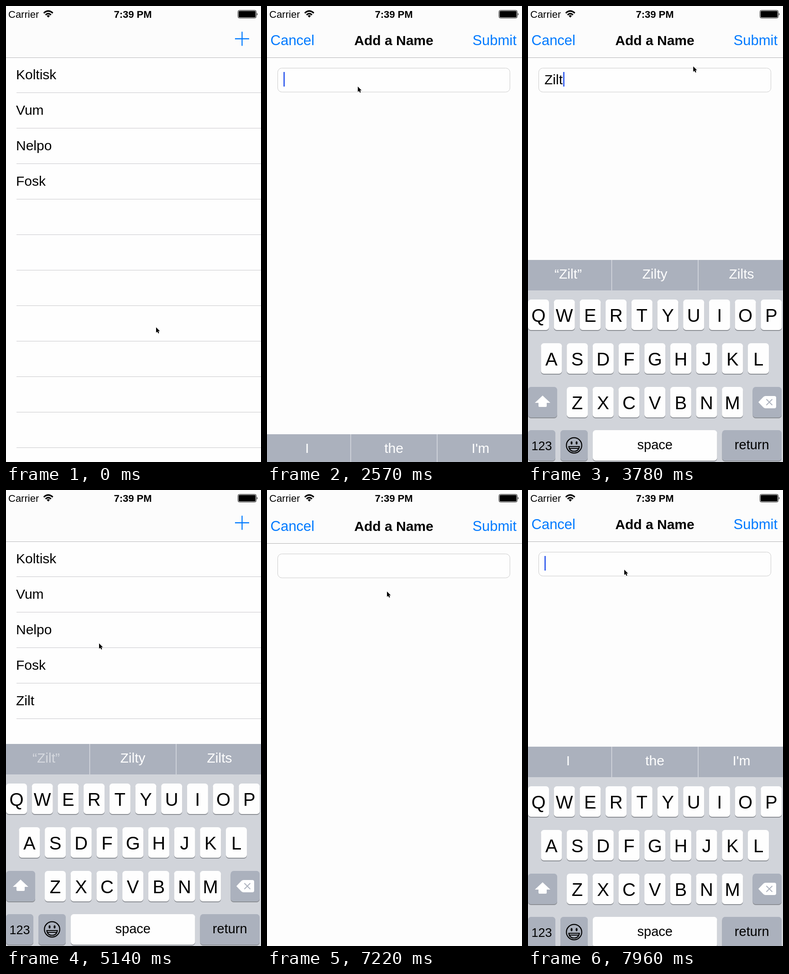
These frames come from a looping animation (559x1002 px, 8 s). An HTML page:

```html
<!DOCTYPE html>
<html lang="en">
<head>
<meta charset="utf-8">
<title>Add a Name</title>
<style>
  html, body { margin: 0; height: 100%; overflow: hidden; background: #fefefe; }
  svg { display: block; width: 100%; height: 100%; }
  text { font: 30px "Liberation Sans", Arial, sans-serif; white-space: pre; }
  .mid { text-anchor: middle; }
  .bold { font-weight: bold; }
  .status { font-size: 22px; }
  .action { font-size: 31px; fill: #007aff; }
  .letter { font-size: 40px; }
  .hint { fill: #fff; text-anchor: middle; }
</style>
</head>
<body>
<svg viewBox="0 0 559 1002">
  <g id="list">
    <rect width="559" height="1002" fill="#fefefe"/>
    <rect width="559" height="113" fill="#fcfcfc"/>
    <path d="M0 113.5H559" stroke="#b9b9bb"/>
    <path id="plus" d="M502 72H533M517.5 56.5V87.5" stroke="#007aff" stroke-width="2.3"/>
  </g>

  <g id="modal">
    <rect width="559" height="1002" fill="#fdfdfd"/>
    <rect width="559" height="113" fill="#fcfcfc"/>
    <path d="M0 113.5H559" stroke="#b2b2b4"/>
    <text class="action" x="7.5" y="86">Cancel</text>
    <text class="mid bold" x="278" y="86">Add a Name</text>
    <text id="submit" class="action" x="547" y="86" text-anchor="end">Submit</text>
    <rect x="23.5" y="136.5" width="509" height="52.5" rx="9" fill="#fefefe" stroke="#cbcbcb"/>
    <text id="typed" x="36" y="172"></text>
    <rect id="caret" y="145" width="3" height="32" fill="#3f66ee"/>
  </g>

  <g id="keyboard">
    <rect width="559" height="446" fill="#d1d4da"/>
    <rect width="559" height="67" fill="#abb1bd"/>
    <path d="M183.5 0V67M373 0V67" stroke="#d9dce2" stroke-width="1.5"/>
    <g id="hints"></g>
    <g id="keys"></g>
    <path d="M32 298L49 314H41V321Q41 323 39 323H25Q23 323 23 321V314H15Z" fill="#fff"/>
    <path d="M505 312.5L516 301Q518 299 521 299H540Q544 299 544 303V322Q544 326 540 326H521Q518 326 516 324Z" fill="#fff"/>
    <path d="M522.5 306L535.5 319M535.5 306L522.5 319" stroke="#abb1bd" stroke-width="2"/>
    <g fill="none" stroke="#000" stroke-width="2.2">
      <circle cx="101" cy="407.5" r="16.8"/>
      <path d="M89.5 410H112.5Q111 420.5 101 420.5T89.5 410ZM91 414H111"/>
    </g>
    <ellipse cx="95.5" cy="402" rx="2" ry="3.6"/>
    <ellipse cx="106.5" cy="402" rx="2" ry="3.6"/>
  </g>

  <text class="status" x="5" y="26">Carrier</text>
  <text class="status mid bold" x="278" y="26">7:39 PM</text>
  <g fill="none" stroke="#000" stroke-width="3.2">
    <path d="M82.8 15.6Q92.7 6.4 102.6 15.6M86.7 19.6Q92.7 14 98.7 19.6"/>
    <path d="M89.2 21.6Q92.7 18.6 96.2 21.6L92.7 25.4Z" fill="#000" stroke="none"/>
  </g>
  <rect x="508.5" y="9.5" width="40" height="17" rx="3" fill="none" stroke="#000"/>
  <rect x="510" y="11" width="37" height="14" rx="1.5"/>
  <path d="M550 15Q552.6 18 550 21Z"/>

  <path id="pointer" d="M0 0V11.8L2.7 9.4L4.7 13.4L6.7 12.5L4.8 8.5H8.4Z" stroke="#fff" stroke-width="1" paint-order="stroke"/>
</svg>

<script>
const LOOP = 8000;
const STAGE_HEIGHT = 1002;
const KEYBOARD_HEIGHT = 444;
const el = id => document.getElementById(id);

function add(parent, tag, attrs, text = "") {
  const node = document.createElementNS("http://www.w3.org/2000/svg", tag);
  for (const name in attrs) node.setAttribute(name, attrs[name]);
  node.textContent = text;
  el(parent).append(node);
  return node;
}

// List rows
const rows = ["Koltisk", "Vum", "Nelpo", "Fosk", "Zilt"].map((name, i) =>
  add("list", "text", { x: 22, y: 161 + 78 * i }, name));
for (let y = 190.5; y < STAGE_HEIGHT; y += 78) {
  add("list", "path", { d: `M23 ${y}H559`, stroke: "#c9c8cc" });
}

// Keyboard
function addKey(x, y, width, label, dark, size = 29, baseline = 42) {
  const shape = { x, width, height: 67, rx: 6.5 };
  add("keys", "rect", { ...shape, y: y + 2, fill: "#8d9096" });
  add("keys", "rect", { ...shape, y, fill: dark ? "#abb1bd" : "#fefefe" });
  add("keys", "text", { x: x + width / 2, y: y + baseline, class: "mid", style: `font-size:${size}px` }, label);
}
[["QWERTYUIOP", 0], ["ASDFGHJKL", 28.4], ["ZXCVBNM", 85]].forEach(([letters, left], row) =>
  [...letters].forEach((letter, i) =>
    addKey(left + i * 56.7, 87 + 96 * row, 46, letter, false, 40, 49)));
addKey(0, 279, 64, "", true);
addKey(492.5, 279, 63.5, "", true);
addKey(0, 374, 60, "123", true, 27, 44);
addKey(71, 374, 60, "", true);
addKey(142, 374, 272.5, "space", false);
addKey(425.5, 374, 130.5, "return", true);

const hints = [88, 278, 468].map(x => add("hints", "text", { x, y: 41, class: "hint" }));

// Start time, field text and suggestions
const typing = [
  [0, "", "I", "the", "I'm"],
  [3290, "Z", "“Z”", "Zoo", "Zero"],
  [3430, "Zi", "“Zi”", "Zip", "Zinc"],
  [3570, "Zil", "“Zil”", "Zilt", "Zilts"],
  [3700, "Zilt", "“Zilt”", "Zilty", "Zilts"],
  [5900, "", "I", "the", "I'm"]
];

// Pointer stops: time, x, y
const pointerStops = [
  [0, 329, 706], [860, 329, 706], [1600, 516, 77], [1850, 516, 77],
  [2450, 199, 177], [3450, 199, 177], [4110, 524, 89], [4400, 524, 89],
  [5020, 204, 337], [5200, 204, 337], [5450, 290, 229], [5790, 348, 835],
  [5940, 348, 835], [6090, 447, 249], [6250, 447, 249], [6640, 516, 77],
  [6840, 516, 77], [7220, 263, 223], [7480, 211, 175], [LOOP, 211, 175]
];

function pointerAt(t) {
  const i = pointerStops.findIndex(stop => stop[0] > t);
  const [t0, x0, y0] = pointerStops[i - 1];
  const [t1, x1, y1] = pointerStops[i];
  const p = (t - t0) / (t1 - t0);
  const eased = p * p * (3 - 2 * p);
  return [x0 + (x1 - x0) * eased, y0 + (y1 - y0) * eased];
}

// Critically damped spring from 0 to 1
function spring(t, start) {
  const phase = Math.max(0, t - start) * 0.01826;
  return 1 - (1 + phase) * Math.exp(-phase);
}

// Fraction hidden below the stage
const hidden = (t, show, hide, showAgain) =>
  1 - spring(t, show) + spring(t, hide) - spring(t, showAgain);

const within = (t, from, to) => t >= from && t < to;
const move = (id, x, y) => el(id).setAttribute("transform", `translate(${x} ${y})`);
const setText = (node, text) => { if (node.textContent !== text) node.textContent = text; };

function draw(now) {
  const t = now % LOOP;
  const modalY = Math.round(STAGE_HEIGHT * hidden(t, 1714.5, 4400, 6794));
  const keyboardY = STAGE_HEIGHT - KEYBOARD_HEIGHT
    + Math.round((KEYBOARD_HEIGHT + 2) * hidden(t, 2535, 5160, 7615));
  move("modal", 0, modalY);
  move("keyboard", 0, keyboardY);
  move("pointer", ...pointerAt(t));

  const [, value, ...words] = typing.findLast(state => state[0] <= t);
  setText(el("typed"), value);
  hints.forEach((hint, i) => setText(hint, words[i]));
  hints[0].setAttribute("opacity", within(t, 4350, 5900) ? 0.5 : 1);

  const editing = within(t, 2535, 4400) || t >= 7615;
  el("caret").setAttribute("opacity", editing ? 1 : 0);
  el("caret").setAttribute("x", 36 + (value ? el("typed").getComputedTextLength() + 1 : 0));

  const plusPressed = within(t, 1640, 2500) || t >= 6700;
  el("plus").setAttribute("opacity", plusPressed ? 0.6 : 1);
  el("submit").setAttribute("opacity", within(t, 4250, 4900) ? 0.4 : 1);
  rows[4].setAttribute("opacity", t >= 4250 ? 1 : 0);
}

const begin = performance.now();
function tick() {
  draw(performance.now() - begin);
  requestAnimationFrame(tick);
}
tick();
</script>
</body>
</html>
```
